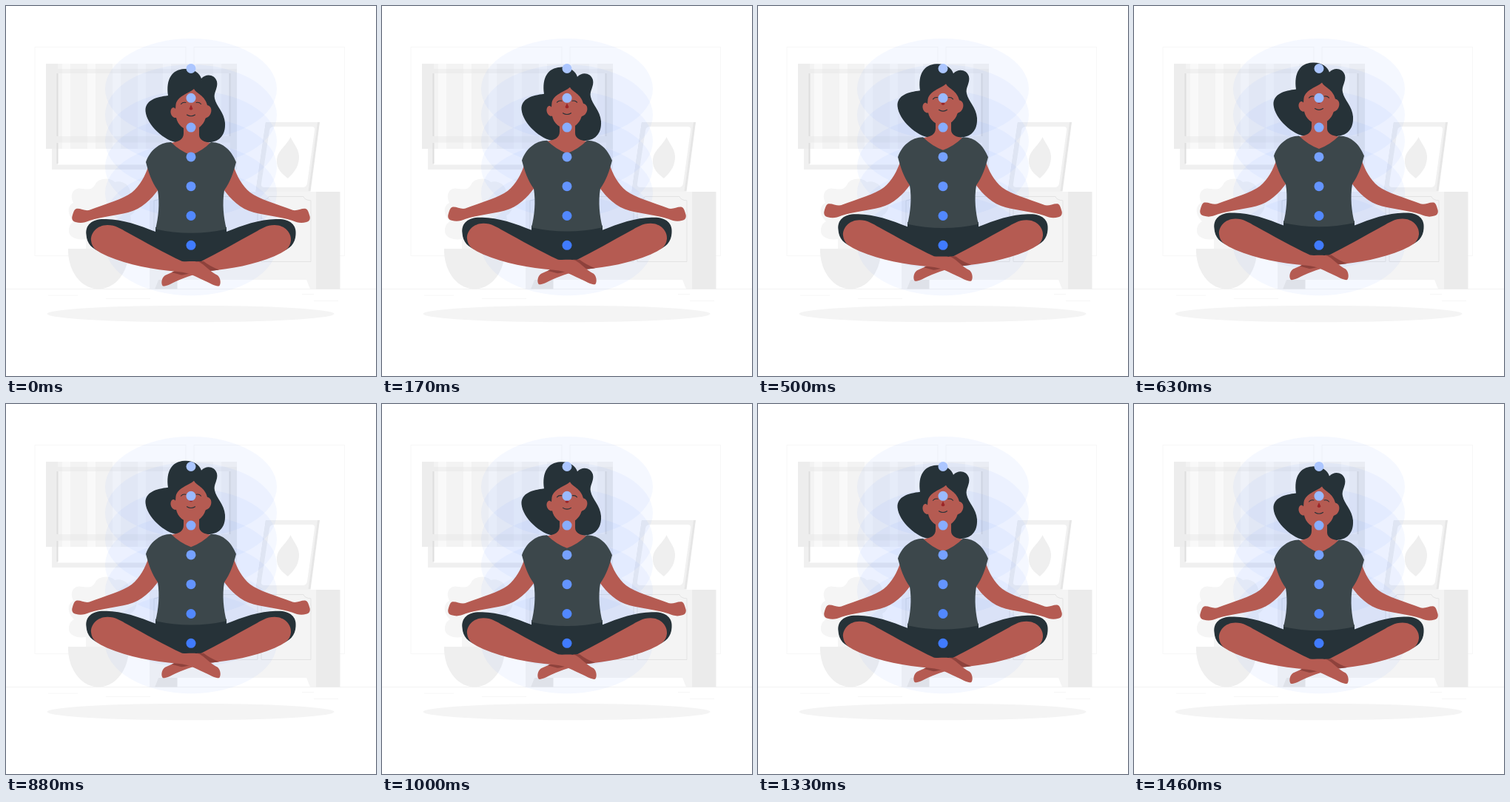
These frames come from a looping animation (500 px wide and 500 px high, 1.5 s). An HTML page:

```html
<!DOCTYPE html>
<html lang="en">
<head>
<meta charset="utf-8">
<title>Floating meditation</title>
<style>
html, body { margin: 0; width: 100%; height: 100%; overflow: hidden; background: #fff; }
svg { display: block; width: 100vw; height: 100vh; }
</style>
</head>
<body>
<svg viewBox="0 0 500 500">
  <defs>
    <path id="arm" d="M193 215C188 230 181 243 170 252C158 261 136 267 112 276C106 277 100 273 95 274C92 275 91 279 89.500 284C88.500 288 90 291 94 292C101 294 106 293 113 290C128 285 148 283 165 279C184 274 196 261 206 248Z"/>
    <path id="thigh" d="M202 299V305C180 296 154 287 132 288C116 288 107 296 108.500 309C109 321 117 329 128 332L240 346L251 346V299Z"/>
  </defs>

  <!-- room -->
  <g fill="none" stroke="#f7f7f7">
    <rect x="39" y="55.500" width="204" height="282"/>
    <rect x="254" y="55.500" width="203.500" height="282"/>
  </g>
  <path d="M0 382.500H500" stroke="#efefef" stroke-width=".8"/>
  <path d="M57 391H97M135 395.500H195M400 389.500H416M416 398.500H449" stroke="#f4f4f4" stroke-width=".8"/>

  <!-- window and blind -->
  <path fill="#f0f0f0" fill-rule="evenodd" d="M62 85H312V221H62ZM70 91V214.500H303V91Z"/>
  <rect x="54" y="78" width="258" height="115" fill="#f3f3f3"/>
  <g id="slats" fill="#f9f9f9"></g>
  <path fill="#e4e4e4" opacity=".4" d="M54 78H70V193H54ZM303 85H312V193H303ZM70 85H303V91H70ZM70 176H303V184.500H70Z"/>
  <path d="M69.500 91V176M69.500 185V213M302.500 91V176" stroke="#dedede" stroke-width="2"/>

  <!-- plant -->
  <path fill="#f5f5f5" d="M120 242C124 232 141 231 147 238C157 235 168 242 168 253C181 260 178 279 168 283C172 299 158 310 143 307V328H108V315C95 317 84 312 85 303C85 297 88 293 92 291C83 283 82 270 91 266C85 254 92 244 103 247C108 247 115 250 120 242Z"/>
  <path fill="#efefef" d="M84 328H166C167 357 149 382.500 125 382.500S83 357 84 328Z"/>

  <!-- cabinet -->
  <rect x="419" y="251" width="32.500" height="131.500" fill="#ebebeb"/>
  <path fill="#f4f4f4" d="M194 251H419V382.500H411L406 370H206L201 382.500H194Z"/>
  <path fill="#e8e8e8" d="M206 370H231.500V382.500H201Z"/>
  <g fill="none" stroke="#e3e3e3">
    <path d="M210 257.500H330Q331 262 340 263V345.500H200V263Q208 262 210 257.500Z"/>
    <path d="M355 257.500H402Q403 262 412 263V345.500H345V263Q354 262 355 257.500Z"/>
  </g>

  <!-- picture -->
  <path fill="#e6e6e6" d="M351 157H424L411.500 250.500H337.500Z"/>
  <path fill="#f1f1f1" d="M351 157H421L408.500 250.500H337.500Z"/>
  <path fill="#fff" d="M362 163H413Q418 163 417 168L407 240Q406 245 401 245H349Q344 245 345 240L356 168Q357 163 362 163Z"/>
  <path fill="#efefef" d="M384.500 177C389 187 397 194 396 206C395 219 388 226 381 233C374 227 365 221 366 208C367 195 379 189 384.500 177Z"/>

  <ellipse cx="249.500" cy="416" rx="194" ry="11.300" fill="#f4f4f4"/>
  <g id="aura" fill="#407bff" fill-opacity=".05"></g>

  <!-- woman -->
  <g id="woman">
    <path fill="#263238" d="M219 121C216 99 224 86 241 85C252 84 262 90 264 98C270 91 282 92 285 102C287 111 280 117 282 125C284 135 295 144 296 158C297 176 287 185 270 184.500H232C215 183 190 161 188.500 142C188 127 203 123 219 121Z"/>
    <g fill="#b55b52">
      <path d="M240 158H261V174C261 181 268 184 277 185L263 201L250 205L236 201L223 185C233 183 240 181 240 172Z"/>
      <path d="M229.500 133C232 121 246 119 254 112C257 118 269 121 272 134C278 135 279 143 275 148C273 151 271 150 269.500 152C267 161 259 167.500 250 167.500C240 167.500 232 161 230 151C226 152 222 147 222.500 142C223 137 227 136 229 139Z"/>
      <use href="#arm"/>
      <use href="#arm" transform="matrix(-1 0 0 1 500 0)"/>
    </g>
    <path fill="#9b2528" d="M250 133.500L247.500 139Q250 142 252.500 139Z"/>
    <g fill="none" stroke="#263238" stroke-width="1.100" stroke-linecap="round">
      <path d="M236.500 132.500Q239 129.500 243 130.500M257 130.500Q261 129.500 263.500 132.500"/>
      <path d="M244.500 147Q250 150.500 255.500 147"/>
    </g>
    <g fill="#263238">
      <use href="#thigh"/>
      <use href="#thigh" transform="matrix(-1 0 0 1 500 0)"/>
    </g>
    <path fill="#3c474b" d="M223 184C207 184 194 196 189 211C193 226 197 238 205 249C208 267 206 286 202 301.500Q250 312 298 301.500C294 286 292 267 295 249C303 238 307 226 311 211C305 196 294 184 277 184Q265 196 250 201.500Q235 196 223 184Z"/>
    <path fill="#b55b52" d="M363 296C377 296 386 307 385 317C384 328 376 332 363 338C334 350 305 355 275 358C257 361 244 366 230 372C222 376 216 379 212 378.500C209 376 210 367 215 364C228 359 240 351 252 346H262C286 334 312 319 336 306C345 301 352 296 363 296Z"/>
    <path fill="#8e423c" d="M258 345H267Q276 352 288 356.500Q279 358 270 358ZM224 360L234 355L252 360.500Q242 363 237 363.500Z"/>
    <path fill="#b55b52" d="M137 296C123 296 114 307 115 317C116 328 124 332 137 338C166 350 198 356 232 359C250 360 260 368 270 372C278 376 284 379 288 378.500C291 376 290 367 286 364C276 359 269 350 261 346C254 344 245 346 238 345C214 334 188 319 164 306C155 301 148 296 137 296Z"/>
  </g>

  <g id="dots"></g>
</svg>
<script>
const NS = 'http://www.w3.org/2000/svg';
const LOOP = 1500, RISE = 10;
const byId = id => document.getElementById(id);

function add(parent, tag, attrs) {
  const el = document.createElementNS(NS, tag);
  for (const key in attrs) el.setAttribute(key, attrs[key]);
  byId(parent).append(el);
}

for (let x = 76; x < 290; x += 34) {
  add('slats', 'rect', { x, y: 78, width: 11, height: 115 });
}
for (let i = 0; i < 7; i++) {
  const mix = (from, to) => Math.round(from + (to - from) * i / 6);
  const fill = `rgb(${mix(172, 64)},${mix(198, 123)},255)`;
  add('aura', 'ellipse', { cx: 250, cy: 112 + i * 35.2, rx: 116, ry: 68 });
  add('dots', 'circle', { cx: 250, cy: 84.5 + i * 39.8, r: 6.5, fill });
}

// Straight up and down at constant speed.
function draw(time) {
  const p = time % LOOP / LOOP;
  const lift = RISE * (1 - Math.abs(1 - 2 * p));
  byId('woman').setAttribute('transform', `translate(0 ${-lift})`);
}

const start = performance.now();
function tick() {
  draw(performance.now() - start);
  requestAnimationFrame(tick);
}
tick();
</script>
</body>
</html>
```
